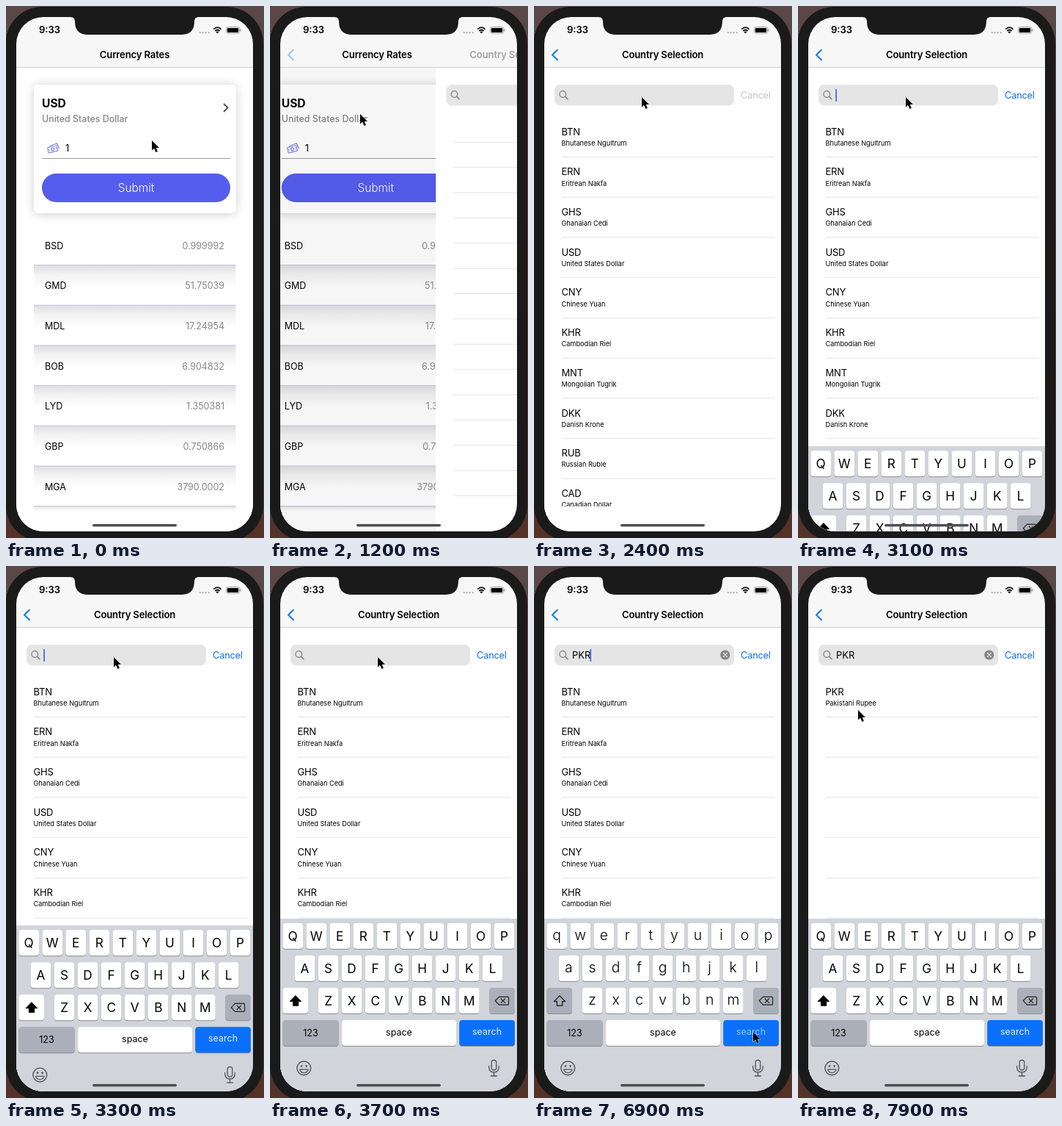
Recreate the animation shown at these times as an HTML page. Size 352 by 724 pixels, loop 8000 ms.

```html
<!DOCTYPE html>
<html lang="en">
<head>
<meta charset="utf-8">
<title>Currency Rates</title>
<style>
  html, body { margin: 0; width: 100%; height: 100%; overflow: hidden; background: #4a3a38; }
  svg { display: block; width: 352px; height: 724px; }
  text { font-family: Inter, "Liberation Sans", sans-serif; white-space: pre; }
</style>
</head>
<body>
<script>
const LOOP = 8000, STEP = 100, ROW = 54.7, WIDTH = 323;

const text = (x, y, size, str, attrs = '') => `<text x="${x}" y="${y}" font-size="${size}" ${attrs}>${str}</text>`;
const rect = (x, y, w, h, fill, r = 0, attrs = '') =>
  `<rect x="${x}" y="${y}" width="${w}" height="${h}" fill="${fill}" rx="${r}" ${attrs}/>`;
const path = (d, stroke, width = 1, attrs = '') =>
  `<path d="${d}" stroke="${stroke}" stroke-width="${width}" fill="none" ${attrs}/>`;
const group = (id, body, attrs = '') => `<g id="${id}" ${attrs}>${body}</g>`;
const range = n => [...Array(n).keys()];
const MID = 'text-anchor="middle"', ROUND = 'stroke-linecap="round" stroke-linejoin="round"';

// Rates page
const rates = [['BSD', '0.999992'], ['GMD', '51.75039'], ['MDL', '17.24954'], ['BOB', '6.904832'],
  ['LYD', '1.350381'], ['GBP', '0.750866'], ['MGA', '3790.0002']];

const rateRow = ([code, value], i) => {
  const y = 352.5 + i * ROW;
  return rect(38, y, 275.5, Math.min(30, 688 - y), 'url(#fall)')
    + path(`M38 ${y}H313.5`, '#c6c3e6')
    + text(53, y - 22, 12.5, code)
    + text(298, y - 22, 12.5, value, 'text-anchor="end" fill="#888"');
};

const notes = `<g transform="rotate(-14 64 194)">${rect(57, 191, 13, 7.5, '#fff', 1, 'stroke="#7478d8"')}
  <circle cx="63.5" cy="194.8" r="2" fill="none" stroke="#7478d8"/>
  ${path('M60 189.5L71 188.5L72.5 196.5', '#7478d8')}${path('M58.8 193v3.6M68.3 193v3.6', '#7478d8', .8)}</g>`;

const ratesPage = rect(14, 84, WIDTH, 631, '#fff')
  + rect(38, 107, 275.5, 175, '#fff', 6, 'filter="url(#glow)"')
  + rect(14, 298, WIDTH, 417, '#fff')
  + text(49, 138, 15.6, 'USD', 'font-weight="700"')
  + text(49, 158, 12.4, 'United States Dollar', 'font-weight="500" fill="#858585"')
  + path('M297 133L302.6 138.5L297 144', '#505050', 1.9)
  + notes + text(81, 198, 13, '1')
  + path('M49 207.5H306', '#9b9b9f')
  + rect(49, 228, 257, 39, '#555dee', 19.5)
  + text(177.5, 253, 15.4, 'Submit', MID + ' fill="#fff" font-weight="300"')
  + rates.map(rateRow).join('');

// Country page
const countries = [['BTN', 'Bhutanese Ngultrum'], ['ERN', 'Eritrean Nakfa'], ['GHS', 'Ghanaian Cedi'],
  ['USD', 'United States Dollar'], ['CNY', 'Chinese Yuan'], ['KHR', 'Cambodian Riel'],
  ['MNT', 'Mongolian Tugrik'], ['DKK', 'Danish Krone'], ['RUB', 'Russian Ruble'], ['CAD', 'Canadian Dollar']];

const country = ([code, name], i) =>
  text(37.5, 175.6 + i * ROW, 13, code, 'letter-spacing="-.2"') + text(37.5, 189.8 + i * ROW, 9.2, name);
const lines = (n, y, gap, right) =>
  range(n).map(i => path(`M38 ${y + i * gap}H${right}`, '#e4e4e6')).join('');

const searchBar = rect(28, 107, 245, 28.5, '#e5e5e6', 8)
  + `<circle cx="39.2" cy="120" r="4.3" fill="none" stroke="#828286" stroke-width="1.3"/>`
  + path('M42.4 123.2L46 126.8', '#828286', 1.5, ROUND)
  + text(282, 125.7, 12.8, 'Cancel', 'id="cancel" letter-spacing="-.2"')
  + text(52, 126, 13, '', 'id="query"')
  + rect(0, 113, 1.7, 17, '#4a5fe2', .5, 'id="caret"')
  + group('clear', `<circle cx="260.8" cy="121" r="6.6" fill="#858589"/>`
    + path('M258.3 118.5l5 5m0-5l-5 5', '#f0f0f0', 1.3, ROUND));

const countryPage = rect(14, 84, WIDTH, 631, '#fff') + searchBar
  + group('empty', lines(15, 185.3, 34.37, 337))
  + group('ruled', lines(9, 205.5, ROW, 329))
  + group('all', countries.map(country).join(''), 'clip-path="url(#list)"')
  + group('found', country(['PKR', 'Pakistani Rupee'], 0))
  + rect(-4.7, -4.7, 9.4, 9.4, '#5a5df0', 0, 'id="cube"');

// Keyboard
const key = (x, y, w, fill = '#fff') => rect(x, y + 1, w, 35, '#898b90', 4) + rect(x, y, w, 35, fill, 4);
const keyRows = [['QWERTYUIOP', 31.2, 486], ['ASDFGHJKL', 47.4, 530], ['ZXCVBNM', 79.6, 574]];
const eachKey = draw => keyRows.map(([chars, x, y]) =>
  [...chars].map((c, i) => draw(c, x + i * 32.04, y)).join('')).join('');
const arrow = 'M35 584.8L42.6 592.6H38.6V598.4H31.4V592.6H27.4Z';
const GREY = '#abafba';

const keyboard = rect(14, 480, WIDTH, 260, '#d1d4da')
  + eachKey((c, x, y) => key(x - 13.8, y, 27.6))
  + group('upper', eachKey((c, x, y) => text(x, y + 24, 17.2, c, MID))
    + key(17.4, 574, 34.6) + path(arrow, '#000', 1, 'style="fill:#000" ' + ROUND))
  + group('lower', eachKey((c, x, y) => text(x, y + 23.2, 19.4, c.toLowerCase(), MID + ' font-weight="300"'))
    + key(17.4, 574, 34.6, GREY) + path(arrow, '#111', 1.2, ROUND))
  + key(299.4, 574, 34.6, GREY)
  + path('M312.5 586.3H324.3Q325.6 586.3 325.6 587.6V595.9Q325.6 597.2 324.3 597.2H312.5L307.3 591.7Z', '#222', 1.2, ROUND)
  + path('M315.2 589l5.4 5.4m0-5.4l-5.4 5.4', '#222', 1.2, ROUND)
  + key(17.4, 618, 76.2, GREY) + key(98, 618, 156) + key(258.3, 618, 75.7, '#0a70fb')
  + text(55.5, 639.5, 12.5, '123', MID) + text(176, 639, 12.5, 'space', MID)
  + text(296, 638.3, 12.5, 'search', MID + ' id="go" fill="#e4efff"')
  + `<circle cx="46.3" cy="683.4" r="9.4" fill="none" stroke="#505459" stroke-width="1.4"/>
     <circle cx="43" cy="680.6" r="1.4" fill="#505459"/><circle cx="49.6" cy="680.6" r="1.4" fill="#505459"/>`
  + path('M40.6 685.2H52Q50.8 689.6 46.3 689.6T40.6 685.2Z', '#505459', 1.2, ROUND)
  + rect(302.2, 672.5, 6.6, 13.5, 'none', 3.3, 'stroke="#505459" stroke-width="1.3"')
  + path('M298.8 680.5V683Q299.4 689 305.5 689T312.2 683V680.5M305.5 689V694M301.5 694H309.5', '#505459', 1.3, ROUND);

// Bars and phone body
const navBar = rect(14, 15, WIDTH, 68.5, '#f7f7f7') + path('M14 83.5H337', '#cfcfd1')
  + text(0, 71.3, 13.1, 'Currency Rates', MID + ' id="titleA" font-weight="600" letter-spacing="-.15"')
  + text(0, 71.3, 13.1, 'Country Selection', MID + ' id="titleB" font-weight="600" letter-spacing="-.15"')
  + path('M31.8 59.8L25 66.5L31.8 73.2', '#1a7cf2', 2.2, 'id="back" ' + ROUND);

const statusBar = text(45, 37.4, 13, '9:33', 'font-weight="600"')
  + range(4).map(i => `<circle cx="${264.8 + i * 4}" cy="36.3" r="1.3" fill="#bdbdbd"/>`).join('')
  + path('M283.2 31.6Q288.4 26.8 293.6 31.6M285.2 34Q288.4 31 291.6 34', '#000', 1.7)
  + `<path d="M286.3 35.3Q288.4 33.8 290.5 35.3L288.4 37.6Z"/>`
  + rect(300.5, 28.6, 18, 8.6, 'none', 2.5, 'stroke="#888" stroke-width=".8"')
  + rect(301.8, 29.9, 15.4, 6, '#000', 1.4) + rect(319.4, 31.2, 1.2, 3.4, '#888', .6);

document.body.innerHTML = `<svg viewBox="0 0 352 724">
  <defs>
    <clipPath id="screen">${rect(14, 15, WIDTH, 700, '#000', 37)}</clipPath>
    <clipPath id="list">${rect(14, 150, WIDTH, 531, '#000')}</clipPath>
    <linearGradient id="fall" x2="0" y2="1"><stop stop-color="#dfdfe1"/>
      <stop offset=".45" stop-color="#f3f3f4"/><stop offset="1" stop-color="#fff"/></linearGradient>
    <linearGradient id="wall" x2="0" y2="1"><stop stop-color="#5b4846"/><stop offset="1" stop-color="#553229"/></linearGradient>
    <filter id="glow" x="-10%" y="-15%" width="120%" height="130%">
      <feDropShadow dx="0" dy="1" stdDeviation="7" flood-opacity=".2"/></filter>
  </defs>
  ${rect(0, 0, 352, 724, 'url(#wall)')}
  ${rect(-.5, 1, 351.5, 728, '#1a1a1a', 50)}
  <g clip-path="url(#screen)">
    ${group('pageA', ratesPage)}
    ${rect(14, 84, WIDTH, 631, '#000', 0, 'id="dim"')}
    ${group('pageB', countryPage)}
    ${navBar}${statusBar}
    ${group('keys', keyboard)}
    ${rect(118, 705, 115, 3.6, '#505050', 1.8)}
  </g>
  <path d="M88 14V15Q94 15 94 21Q94 39 112 39H239Q257 39 257 21Q257 15 263 15V14Z" fill="#1a1a1a"/>
  <path id="mouse" d="M0 0V13.6L3.1 10.8L5.4 16L7.9 15L5.7 9.9H10Z" stroke="#fff" stroke-width="1" paint-order="stroke"/>
</svg>`;

// Motion
const el = id => document.getElementById(id);
const set = (id, attrs) => Object.entries(attrs).forEach(([k, v]) => el(id).setAttribute(k, v));
const show = (id, on) => set(id, { opacity: +on });
const clamp = v => Math.max(0, Math.min(1, v));
const spring = (t, start, rate) => {
  const u = Math.max(0, t - start) / 1000 * rate;
  return 1 - (1 + u) * Math.exp(-u);
};

const mousePath = [[0, 199, 183], [100, 199, 183], [800, 122, 150], [1200, 123, 147], [1400, 128, 139],
  [1800, 130, 136], [2400, 147, 124], [5200, 147, 124], [5500, 291, 627], [6200, 291, 627],
  [6800, 299, 634], [7100, 299, 634], [7800, 82, 196], [8000, 82, 196]];

function mouseAt(t) {
  const i = mousePath.findIndex(p => p[0] > t);
  const [t0, x0, y0] = mousePath[i - 1], [t1, x1, y1] = mousePath[i];
  const u = (t - t0) / (t1 - t0), k = u * u * (3 - 2 * u);
  return [x0 + (x1 - x0) * k, y0 + (y1 - y0) * k];
}

function blink(age) {
  if (age < 500) return 1;
  const u = (age - 500) % 1000;
  return u < 400 ? clamp(1 - (u + 100) / 300) : clamp((u - 300) / 300);
}

// The cube walks round a square, turning and shrinking at every second corner.
function cubeAt(t) {
  const u = Math.max(0, t - 930) / 450 % 4, side = Math.floor(u), f = u - side;
  const x = [f, 1, 1 - f, 0][side], y = [0, f, 1, 1 - f][side];
  const scale = 1 - .5 * (side % 2 ? 1 - f : f);
  return `translate(${192.5 + 19.5 * x} ${355 + 19.5 * y}) rotate(${-90 * u}) scale(${scale})`;
}

function draw(t) {
  const push = spring(t, 1100, 12.15), rest = 1 - push;
  set('pageA', { transform: `translate(${-97 * push} 0)` });
  set('dim', { opacity: .1 * push });
  set('pageB', { transform: `translate(${WIDTH * rest} 0)` });
  set('titleA', { x: 175.5 - 86 * push, opacity: clamp(rest * 1.7) });
  set('titleB', { x: 175.5 + 232 * rest, opacity: push });
  show('back', clamp(push * 1.15));

  const loaded = t >= 1900, filtered = t >= 7200;
  show('empty', !loaded);
  show('cube', !loaded);
  show('ruled', loaded);
  show('all', loaded && !filtered);
  show('found', filtered);
  set('cube', { transform: cubeAt(t) });

  const active = t >= 2900;
  const strokes = [4000, 4400, 4800].filter(s => t >= s), typed = strokes.length;
  set('cancel', { fill: active ? '#0a6ee0' : '#c5c5c7' });
  el('query').textContent = 'PKR'.slice(0, typed);
  set('caret', { x: 51.2 + 8.4 * typed, opacity: active && !filtered ? blink(t - (strokes.pop() || 3000)) : 0 });
  show('clear', typed > 0);

  const capitals = t < 4000 || t >= 7000;
  show('upper', capitals);
  show('lower', !capitals);
  set('go', { opacity: t >= 6800 && t < 7000 ? .65 : 1 });
  set('keys', { transform: `translate(0 ${240 * (1 - spring(t, 3000, 16.9))})` });

  set('mouse', { transform: `translate(${mouseAt(t)})` });
}

const origin = performance.now();
function tick() {
  const t = (performance.now() - origin) % LOOP;
  draw(Math.floor(t / STEP) * STEP);
  requestAnimationFrame(tick);
}
tick();
</script>
</body>
</html>
```
